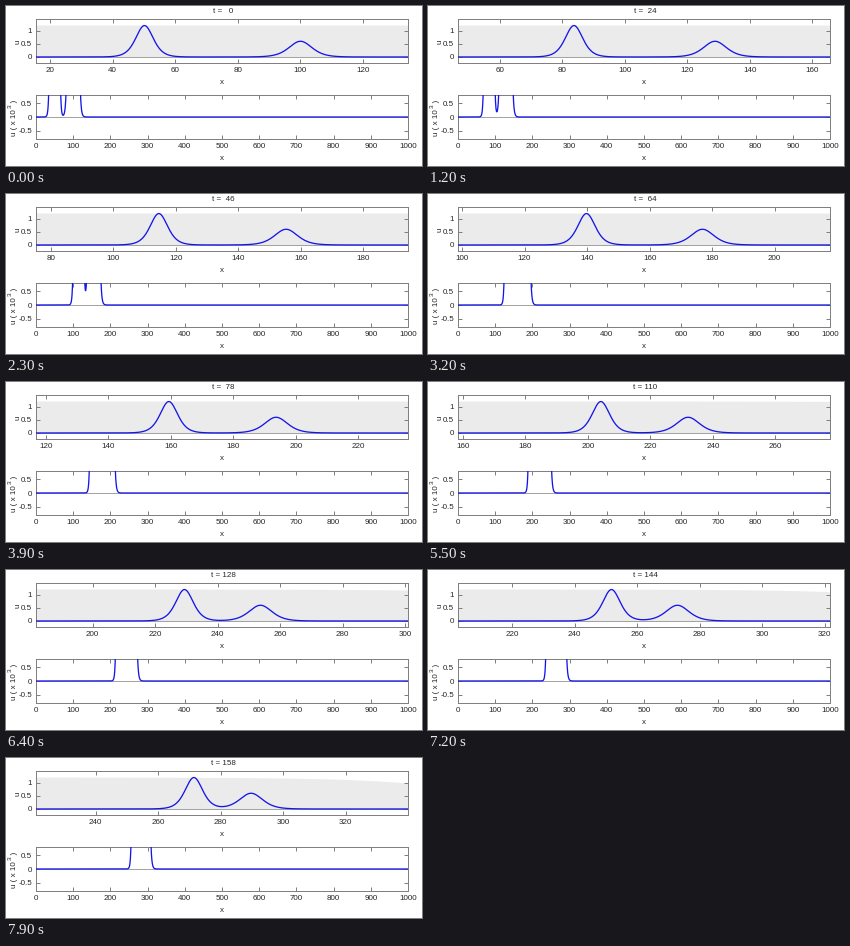
These frames come from a looping animation (416 px wide and 160 px high, 8000 ms). A matplotlib script:

```python
import numpy as np
import matplotlib.pyplot as plt
from matplotlib.animation import FuncAnimation
from matplotlib.ticker import MultipleLocator

W, H, DPI = 416, 160, 100
PX = 72 / DPI  # points per pixel
FRAMES, INTERVAL, DT = 80, 100, 2
HALF = 59.5  # half width of the moving window
FRAME, TEXT, BLUE = "0.5", "0.15", "#1414ea"

plt.rcParams.update({
    "font.family": "Liberation Sans",
    "font.size": 8 * PX,
    "text.color": TEXT,
    "axes.linewidth": PX,
    "axes.edgecolor": FRAME,
    "axes.unicode_minus": False,
})


def soliton(x, amp, centre):
    """Solitary wave of the BBM equation with speed 1 + amp / 3."""
    c = 1 + amp / 3
    k = 0.5 * np.sqrt((c - 1) / c)
    return amp / np.cosh(np.clip(k * (x - centre), -300, 300)) ** 2


def wave(x, t):
    return soliton(x, 1.2, 50.2 + 1.4 * t) + soliton(x, 0.6, 100.1 + 1.2 * t)


def peak_envelope(x):
    return 1.2 - 0.23 * np.exp((x - 340) / 22)


def make_axes(top, bottom, ylim, yticks):
    ax = fig.add_axes([30 / W, 1 - bottom / H, 372 / W, (bottom - top) / H])
    ax.set_ylim(*ylim)
    ax.set_yticks(yticks, [f"{v:g}" for v in yticks])
    ax.tick_params(direction="in", top=True, right=True, length=4 * PX,
                   width=PX, pad=4 * PX, color=FRAME, labelcolor=TEXT)
    ax.axhline(0, color="0.55", lw=0.8 * PX, zorder=1.5)
    line, = ax.plot([], [], color=BLUE, lw=1.3 * PX, zorder=3)
    return ax, line


def label(x, y, text, **kw):
    return fig.text(x / W, 1 - y / H, text, ha="center", va="center", **kw)


fig = plt.figure(figsize=(W / DPI, H / DPI), dpi=DPI, facecolor="white")

near, near_line = make_axes(13, 57, (-0.23, 1.45), [0, 0.5, 1])
near.xaxis.set_major_locator(MultipleLocator(20))
xs = np.linspace(0, 345, 700)
near.fill_between(xs, 0, peak_envelope(xs), color="0.92", lw=0, zorder=1)

far, far_line = make_axes(89, 133, (-0.8, 0.8), [-0.5, 0, 0.5])
far.set_xlim(0, 1000)
far.xaxis.set_major_locator(MultipleLocator(100))

title = label(217, 5.5, "")
label(216, 76, "x")
label(216, 152.5, "x")
label(12, 35.5, "u", rotation=90)
label(8, 111.5, "u ( x 10   )", rotation=90)
label(4, 100.5, "3", rotation=90, fontsize=6.5 * PX)

x_far = np.linspace(0, 1000, 4001)


def update(i):
    t = DT * i
    mid = 75 + 1.3 * t
    x = np.linspace(mid - HALF, mid + HALF, 600)
    near.set_xlim(x[0], x[-1])
    near_line.set_data(x, wave(x, t))
    far_line.set_data(x_far, 1000 * wave(x_far, t))
    title.set_text(f"t = {t:3d}")
    return near_line, far_line, title


anim = FuncAnimation(fig, update, frames=FRAMES, interval=INTERVAL,
                     init_func=lambda: update(0), repeat=True, repeat_delay=0)
plt.show()
```
